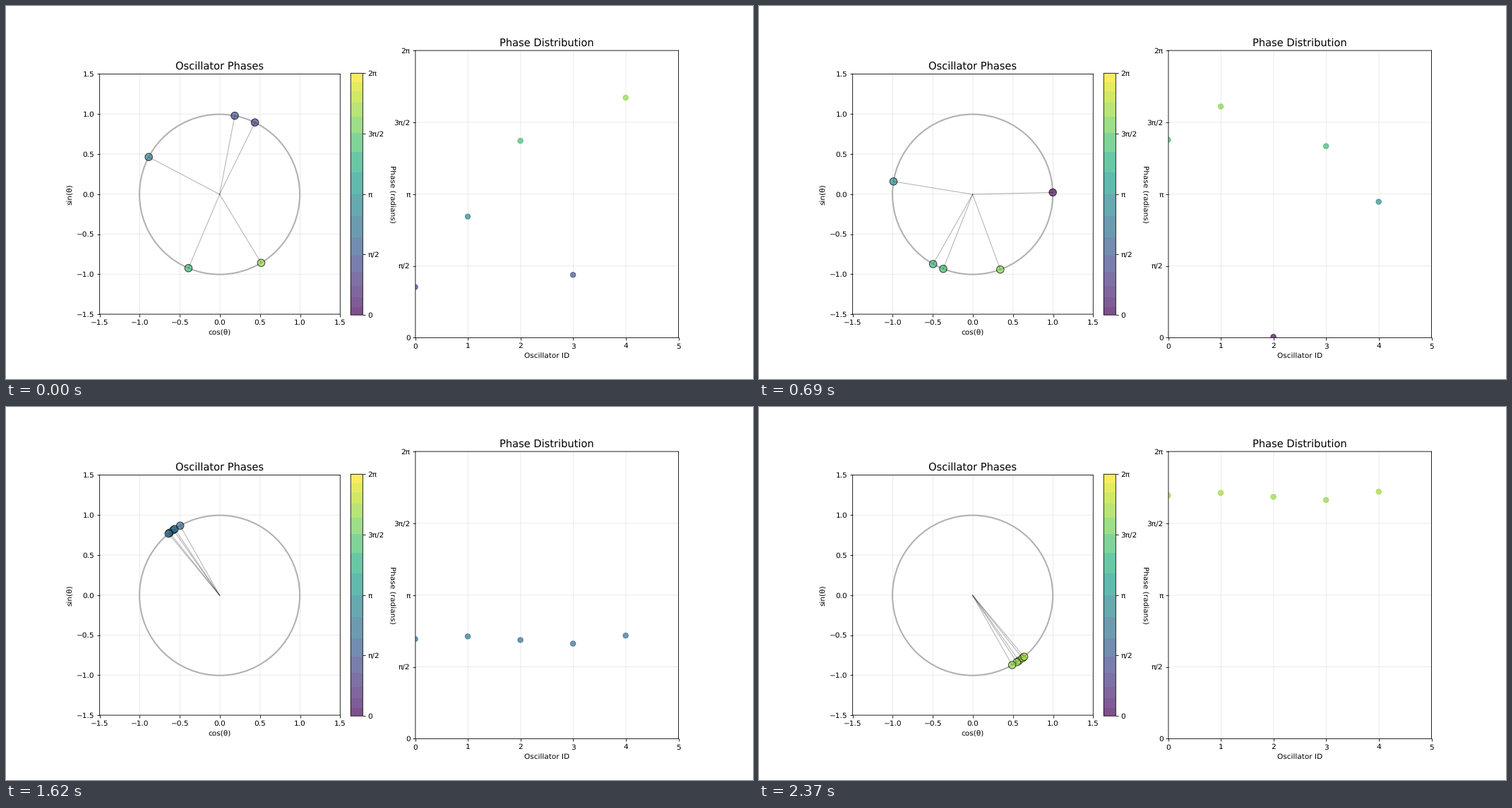
Write a matplotlib script that moves like this. It is 1058 px wide and 529 px high and loops after 2400 ms.

```python
import numpy as np
import matplotlib.pyplot as plt
from matplotlib.animation import FuncAnimation
from matplotlib.cm import ScalarMappable
from matplotlib.colors import ListedColormap, Normalize
from matplotlib.patches import Circle
from matplotlib.transforms import ScaledTranslation

FRAMES, INTERVAL = 80, 30
TAU = 2 * np.pi

# Coupled oscillators, rates per frame
START = np.array([1.115, 2.656, 4.313, 1.381, 5.257])
DETUNING = np.array([-0.001, 0.053, -0.032, -0.101, 0.080])
DRIFT = TAU / 50
COUPLING = 0.182

# Soft, unsnapped lines and text
plt.rcParams.update({"path.snap": False, "text.hinting": "none"})
HALF_PIXEL = 0.005  # inches


def simulate():
    history = [START]
    for _ in range(FRAMES - 1):
        theta = history[-1]
        pull = np.sin(theta[None, :] - theta[:, None]).mean(axis=1)
        history.append(theta + DRIFT + COUPLING * (DETUNING + pull))
    return np.array(history) % TAU


def banded_viridis(bands=16):
    """Viridis at 70 % over white, in flat steps that are widest mid-scale."""
    even = np.linspace(0, 1, bands + 1)
    edges = even - 0.45 * np.sin(TAU * even) / TAU
    middles = (edges[:-1] + edges[1:]) / 2
    position = (np.arange(256) + 0.5) / 256
    band = np.searchsorted(edges, position) - 1
    colors = plt.get_cmap("viridis")(middles[band])[:, :3]
    return ListedColormap(0.7 * colors + 0.3)


phases = simulate()
ids = np.arange(len(START))
norm = Normalize(0, TAU)
pi_ticks = np.linspace(0, TAU, 5)
pi_labels = ["0", "π/2", "π", "3π/2", "2π"]

fig, (ax_circle, ax_phase) = plt.subplots(1, 2, figsize=(14, 7), dpi=75.5715)
shift_x, shift_y = HALF_PIXEL / 14, HALF_PIXEL / 7
fig.subplots_adjust(left=0.125 + shift_x, right=0.9 + shift_x,
                    bottom=0.11 + shift_y, top=0.88 + shift_y)
# Axes sit half a pixel up and right of the data
nudge = ScaledTranslation(-HALF_PIXEL, -HALF_PIXEL, fig.dpi_scale_trans)

ax_circle.set(xlim=(-1.5, 1.5), ylim=(-1.5, 1.5), aspect="equal",
              xlabel="cos(θ)", ylabel="sin(θ)")
ax_circle.set_title("Oscillator Phases", fontsize=14)

ax_phase.set(xlim=(0, 5), ylim=(0, TAU), xlabel="Oscillator ID")
ax_phase.set_yticks(pi_ticks, pi_labels)
ax_phase.set_title("Phase Distribution", fontsize=14)

for ax in (ax_circle, ax_phase):
    ax.grid(alpha=0.3)

on_circle = ax_circle.transData + nudge
on_phase = ax_phase.transData + nudge
ax_circle.add_patch(Circle((0, 0), 1, fill=False, edgecolor="#b2b2b2", lw=2,
                           transform=on_circle))

style = dict(c=START, cmap="viridis", norm=norm, alpha=0.7)
circle_dots = ax_circle.scatter(np.cos(START), np.sin(START), s=100,
                                edgecolors="black", linewidths=1,
                                transform=on_circle, **style)
phase_dots = ax_phase.scatter(ids, START, s=50, transform=on_phase, **style)
spokes = [ax_circle.plot([0, 0], [0, 0], color="black", alpha=0.3, lw=1,
                         transform=on_circle)[0] for _ in ids]
ax_circle.set(xlim=(-1.5, 1.5), ylim=(-1.5, 1.5))
ax_phase.set(xlim=(0, 5), ylim=(0, TAU))

bar = fig.colorbar(ScalarMappable(norm, banded_viridis()), ax=ax_circle,
                   fraction=0.046, pad=0.04)
bar.set_ticks(pi_ticks, labels=pi_labels)
bar.set_label("Phase (radians)", rotation=270, labelpad=15)


def update(frame):
    theta = phases[frame]
    x, y = np.cos(theta), np.sin(theta)
    circle_dots.set_offsets(np.column_stack([x, y]))
    phase_dots.set_offsets(np.column_stack([ids, theta]))
    for dots in (circle_dots, phase_dots):
        dots.set_array(theta)
    for spoke, px, py in zip(spokes, x, y):
        spoke.set_data([0, px], [0, py])
    return [circle_dots, phase_dots, *spokes]


anim = FuncAnimation(fig, update, frames=FRAMES, interval=INTERVAL,
                     repeat=True, repeat_delay=0, blit=False)
plt.show()
```
